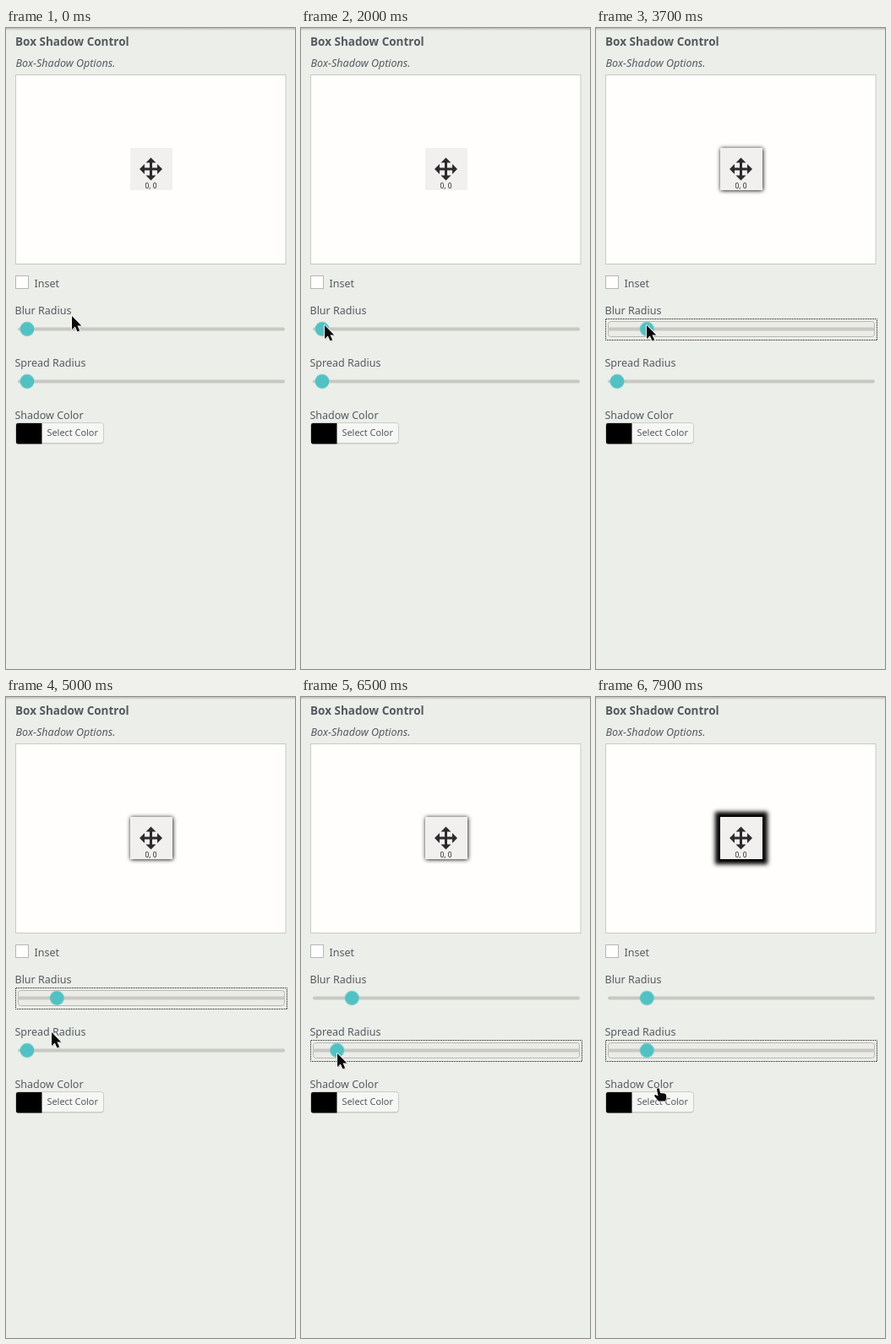
These frames come from a looping animation (342 by 759 pixels, 8000 ms). An HTML page:

```html
<!DOCTYPE html>
<html lang="en">
<head>
<meta charset="utf-8">
<title>Box shadow control</title>
<style>
  html, body { margin: 0; width: 100%; height: 100%; overflow: hidden; background: #ebeee9; }
  svg { display: block; width: 342px; height: 759px; }
  text { font: 12.5px "Noto Sans", "Open Sans", sans-serif; fill: #555a5f; }
  .title { font-size: 13.5px; font-weight: 700; }
  .note { font-size: 12.5px; font-style: italic; }
  .btn { font-size: 10.9px; }
  .offset { font-size: 8.4px; fill: #222; text-anchor: middle; }
  .knob { fill: #50c2c3; }
  .track { fill: #c9c8c3; }
  .dots { fill: none; stroke: #111; stroke-dasharray: 1; stroke-dashoffset: -.5; }
  .ring { fill: #ebebe7; stroke: #b9b8b4; }
  .tile { position: absolute; left: 147px; top: 142px; width: 50px; height: 50px; }

  .anim { animation: 8s step-end -10ms infinite; }
  #arrow { animation-name: arrow; }
  #hand { animation-name: hand; }
  #blurKnob { animation-name: blur; }
  #spreadKnob { animation-name: spread; }
  #blurFocus { animation-name: blurFocus; }
  #spreadFocus { animation-name: spreadFocus; }
  .tile { animation-name: shadow; }

  /* 100 ms = 1.25% */
  @keyframes arrow {
    0% { transform: translate(78px, 341px); }
    1.25% { transform: translate(77px, 335px); }
    5% { transform: translate(77px, 333px); }
    7.5% { transform: translate(78px, 333px); }
    15% { transform: translate(68px, 334px); }
    16.25% { transform: translate(56px, 338px); }
    17.5% { transform: translate(45px, 342px); }
    18.75% { transform: translate(38px, 345px); }
    20% { transform: translate(34px, 347px); }
    21.25% { transform: translate(31px, 349px); }
    22.5% { transform: translate(29px, 350px); }
    23.75% { transform: translate(28px, 351px); }
    25% { transform: translate(28px, 352px); }
    33.75% { transform: translate(34px, 352px); }
    35% { transform: translate(40px, 352px); }
    37.5% { transform: translate(50px, 352px); }
    38.75% { transform: translate(53px, 352px); }
    40% { transform: translate(55px, 352px); }
    41.25% { transform: translate(57px, 352px); }
    43.75% { transform: translate(59px, 352px); }
    46.25% { transform: translate(60px, 352px); }
    62.5% { transform: translate(54px, 397px); }
    65% { transform: translate(46px, 406px); }
    66.25% { transform: translate(38px, 412px); }
    67.5% { transform: translate(31px, 416px); }
    68.75% { transform: translate(27px, 419px); }
    70% { transform: translate(25px, 420px); }
    71.25% { transform: translate(26px, 421px); }
    78.75% { transform: translate(31px, 421px); }
    80% { transform: translate(37px, 422px); }
    81.25% { transform: translate(43px, 422px); }
    82.5% { transform: translate(48px, 422px); }
    83.75% { transform: translate(53px, 422px); }
    87.5% { transform: translate(58px, 422px); }
    88.75% { transform: translate(60px, 422px); }
    96.25% { transform: translate(64px, 433px); }
    97.5% { transform: translate(70px, 449px); }
    98.75%, 100% { transform: translate(74px, 463px); visibility: hidden; }
  }
  @keyframes hand { 0% { visibility: hidden; } 98.75%, 100% { visibility: visible; } }

  /* one slider step = 5.88px */
  @keyframes blur {
    0% { transform: none; }
    30% { transform: translateX(5.88px); }
    33.75% { transform: translateX(11.76px); }
    35% { transform: translateX(17.64px); }
    37.5% { transform: translateX(23.52px); }
    38.75% { transform: translateX(29.4px); }
    40%, 100% { transform: translateX(35.28px); }
  }
  @keyframes spread {
    0% { transform: none; }
    78.75% { transform: translateX(5.88px); }
    80% { transform: translateX(11.76px); }
    81.25% { transform: translateX(17.64px); }
    82.5% { transform: translateX(23.52px); }
    83.75% { transform: translateX(29.4px); }
    87.5%, 100% { transform: translateX(35.28px); }
  }
  @keyframes blurFocus {
    0% { visibility: hidden; }
    30% { visibility: visible; }
    75%, 100% { visibility: hidden; }
  }
  @keyframes spreadFocus { 0% { visibility: hidden; } 75%, 100% { visibility: visible; } }
  @keyframes shadow {
    0% { box-shadow: none; }
    46.25% { box-shadow: 0 0 5px .5px #000; }
    88.75%, 100% { box-shadow: 0 0 5px 6px #000; }
  }
</style>
</head>
<body>
<svg viewBox="0 0 342 759">
  <defs>
    <linearGradient id="edge" x2="0" y2="1">
      <stop offset="0" stop-color="#bdb7b5"/>
      <stop offset="1" stop-color="#ebeee9"/>
    </linearGradient>
    <g id="focus">
      <rect class="dots" x="11.5" y="-12" width="321" height="25"/>
      <rect class="ring" x="14.5" y="-9" width="315" height="18" rx="3"/>
    </g>
    <rect id="track" class="track" x="14" y="-2" width="316" height="4" rx="2"/>
    <circle id="knob" class="knob" cx="25" r="8.4"/>
  </defs>

  <rect width="342" height="759" fill="#ebeee9"/>
  <rect width="342" height="3" fill="url(#edge)"/>
  <text class="title" x="11" y="21">Box Shadow Control</text>
  <text class="note" x="11.5" y="46">Box-Shadow Options.</text>

  <rect x="11.5" y="55.5" width="319.5" height="224" fill="#fffefd" stroke="#c9c9c6"/>
  <foreignObject width="342" height="290"><div class="tile anim"></div></foreignObject>
  <rect x="147" y="142" width="50" height="50" fill="#f1f0ef"/>
  <path transform="translate(156.5 152) scale(1.5)" fill="#2b2b2b"
    d="M19 10l-4 4v-3h-4v4h3l-4 4-4-4h3v-4H5v3l-4-4 4-4v3h4V5H6l4-4 4 4h-3v4h4V6z"/>
  <text class="offset" x="171.5" y="190">0, 0</text>

  <rect x="11.5" y="293.5" width="15" height="15" fill="#fffefd" stroke="#b5b7b6"/>
  <text x="33.5" y="307">Inset</text>

  <text x="10.5" y="339">Blur Radius</text>
  <g transform="translate(0 356.5)">
    <use id="blurFocus" class="anim" href="#focus"/>
    <use href="#track"/>
    <use id="blurKnob" class="anim" href="#knob"/>
  </g>

  <text x="10.5" y="401">Spread Radius</text>
  <g transform="translate(0 418.5)">
    <use id="spreadFocus" class="anim" href="#focus"/>
    <use href="#track"/>
    <use id="spreadKnob" class="anim" href="#knob"/>
  </g>

  <text x="10.5" y="463">Shadow Color</text>
  <rect x="11.5" y="468.5" width="104" height="24" rx="3" fill="#c6c7c4"/>
  <rect x="11.5" y="467.5" width="104" height="24" rx="3" fill="#f6f6f4" stroke="#cbccc9"/>
  <path d="M42.500 468v24.500H14a2 2 0 0 1-2-2V470a2 2 0 0 1 2-2z"/>
  <text class="btn" x="48.5" y="483">Select Color</text>

  <g id="arrow" class="anim" stroke-linejoin="round">
    <path transform="translate(1 1)" fill="#000" opacity=".25"
      d="M0 0V16L3.8 12.4L6.5 18.4L9.2 17.2L6.5 11.4H11.3Z"/>
    <path fill="#0a0a0a" stroke="#fff" stroke-width="1.6" paint-order="stroke"
      d="M0 0V16L3.8 12.4L6.5 18.4L9.2 17.2L6.5 11.4H11.3Z"/>
  </g>
  <path id="hand" class="anim" fill="#0a0a0a" stroke="#fff" stroke-width="1.2" paint-order="stroke" stroke-linejoin="round"
    d="M72 464.5q1-2 2.8-.8l1.4 5.3 5 .6q2 .6 2 2.4v3.5l-1.2 3h-8l-4.6-5.6q-1-1.8.8-2l3.3 1.6z"/>
</svg>
</body>
</html>
```
